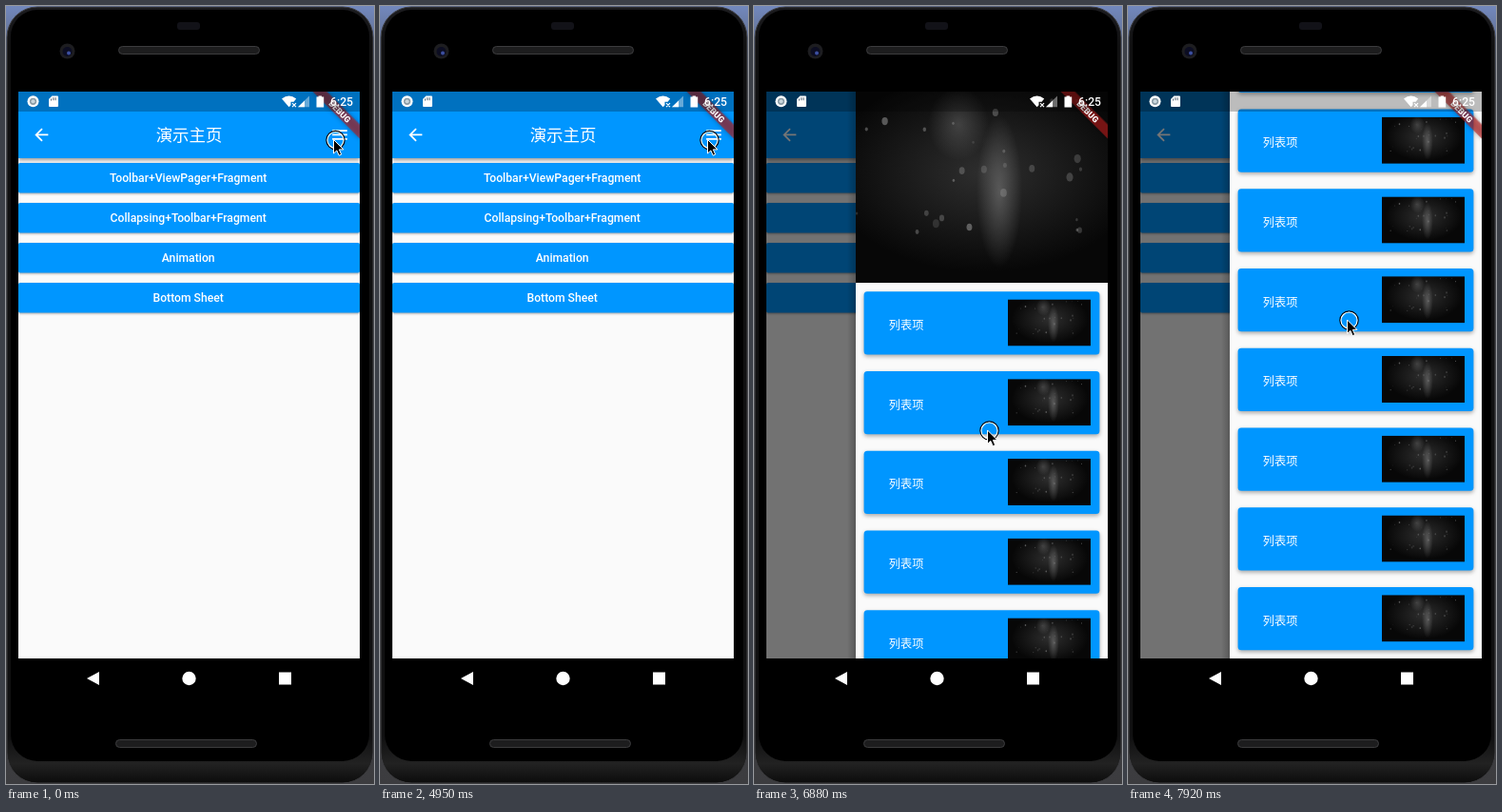
An HTML page for the animation above (8 s loop, 387x818 px).

```html
<!DOCTYPE html>
<html lang="zh">
<head>
<meta charset="utf-8">
<title>Drawer demo</title>
<style>
  html, body { margin: 0; width: 100%; height: 100%; overflow: hidden; background: #000; }
  svg { display: block; width: 387px; height: 818px; }
  text { fill: #fff; text-anchor: middle; font-family: Roboto, "Noto Sans CJK SC", "Noto Sans CJK", sans-serif; font-size: 12.2px; }
  .medium { font-weight: 500; }
  .raised { filter: drop-shadow(0 1px 1px rgba(0,0,0,.35)); }
  .card { filter: drop-shadow(0 2px 2px rgba(0,0,0,.33)); }
</style>
</head>
<body>
<svg viewBox="0 0 387 818" xmlns="http://www.w3.org/2000/svg">
  <defs>
    <clipPath id="screen"><rect x="13" y="90" width="359" height="596"/></clipPath>
    <clipPath id="bar"><rect x="13" y="90" width="359" height="70"/></clipPath>
    <clipPath id="header"><rect width="266" height="201"/></clipPath>
    <clipPath id="photoBox"><rect width="356" height="201"/></clipPath>
    <linearGradient id="body" x1="0" y1="0" x2="0" y2="1">
      <stop offset="0" stop-color="#1c1c1f"/><stop offset=".05" stop-color="#101011"/>
      <stop offset=".94" stop-color="#101011"/><stop offset=".975" stop-color="#222"/>
      <stop offset="1" stop-color="#0c0c0c"/>
    </linearGradient>
    <linearGradient id="back" x1="0" y1="0" x2="0" y2="1">
      <stop offset="0" stop-color="#7288bd"/><stop offset=".1" stop-color="#50545e"/>
      <stop offset="1" stop-color="#3c3c3f"/>
    </linearGradient>
    <linearGradient id="edge">
      <stop offset="0" stop-color="#000" stop-opacity="0"/>
      <stop offset="1" stop-color="#000" stop-opacity=".22"/>
    </linearGradient>
    <radialGradient id="glow">
      <stop offset="0" stop-color="#8a8a8a"/>
      <stop offset="1" stop-color="#8a8a8a" stop-opacity="0"/>
    </radialGradient>
    <g id="photo" clip-path="url(#photoBox)">
      <rect width="356" height="201" fill="#070707"/>
      <ellipse cx="180" cy="85" rx="165" ry="105" fill="url(#glow)" opacity=".3"/>
      <ellipse cx="153" cy="34" rx="32" ry="38" fill="url(#glow)" opacity=".35"/>
      <ellipse cx="196" cy="105" rx="24" ry="80" fill="url(#glow)" opacity=".5"/>
    </g>
  </defs>

  <!-- phone -->
  <rect width="387" height="818" fill="url(#back)"/>
  <rect x="1" y="1" width="385" height="816" rx="32" fill="url(#body)" stroke="#3c3c3f"/>
  <rect x="5" y="4" width="377" height="790" rx="28" fill="#000"/>
  <rect x="180" y="17" width="24" height="8" rx="3" fill="#121218"/>
  <g fill="#1d1d1e" stroke="#3c3c3e">
    <rect x="118.5" y="42.5" width="148" height="8" rx="4"/>
    <rect x="115.5" y="771.5" width="148" height="8" rx="4"/>
  </g>
  <circle cx="64.5" cy="47.5" r="8" fill="#1d1d20"/>
  <circle cx="64.5" cy="48" r="5" fill="#0c0d22"/>
  <circle cx="66" cy="49.5" r="2" fill="#3c4fa0"/>
  <g fill="#fff">
    <path d="M85 707L98 700V714Z"/>
    <circle cx="192.5" cy="707" r="7.2"/>
    <rect x="287" y="700.5" width="13" height="13"/>
  </g>

  <g clip-path="url(#screen)">
    <rect x="13" y="90" width="359" height="596" fill="#fafafa"/>
    <g id="buttons"></g>
    <rect x="13" y="90" width="359" height="70" fill="#0096ff" style="filter:drop-shadow(0 2px 2px rgba(0,0,0,.4))"/>
    <path transform="translate(26.9 125) scale(.873)" fill="#fff" d="M20 11H7.83l5.59-5.59L12 4l-8 8 8 8 1.41-1.41L7.83 13H20v-2z"/>
    <text x="192.5" y="142.2" style="font-size:17.46px">演示主页</text>
    <g clip-path="url(#bar)">
      <g id="ink">
        <circle cx="351" cy="135.5" r="30.6" fill="#bcbcbc" fill-opacity=".3"/>
        <circle id="splash" cx="351" cy="135.5" fill="#c8c8c8" fill-opacity=".4"/>
      </g>
    </g>
    <path transform="translate(340.5 125) scale(.873)" fill="#fff" d="M3 18h18v-2H3v2zm0-5h18v-2H3v2zm0-7v2h18V6H3z"/>
    <g id="tip">
      <rect x="213.3" y="156.5" width="150" height="28" rx="3.5" fill="#616161" fill-opacity=".9"/>
      <text x="288.3" y="174.8">Open navigation menu</text>
    </g>
    <rect id="scrim" x="13" y="90" width="359" height="596"/>

    <g id="drawer">
      <rect x="-9" y="90" width="9" height="596" fill="url(#edge)"/>
      <rect y="90" width="266" height="596" fill="#fafafa"/>
      <g id="list">
        <g transform="translate(0 90)" clip-path="url(#header)"><use href="#photo" x="-45"/></g>
      </g>
    </g>

    <g transform="translate(372 90) rotate(45)">
      <rect x="-35" y="24.4" width="70" height="10.5" fill="#b71c1c" fill-opacity=".63" style="filter:drop-shadow(0 0 2.5px rgba(0,0,0,.5))"/>
      <text y="32.9" style="font-size:8.9px;font-weight:900">DEBUG</text>
    </g>
    <rect x="13" y="90" width="359" height="21" fill-opacity=".25"/>
    <g fill="#fff">
      <circle cx="28.5" cy="100.3" r="6"/>
      <circle cx="28.5" cy="100.3" r="3.6" fill="#8a9ba5"/>
      <circle cx="28.5" cy="100.3" r="2" fill="#c9d6dc"/>
      <path d="M48.4 94.5H54q1 0 1 1V105q0 1-1 1H46q-1 0-1-1V98Z"/>
      <path d="M47.5 97.5v2M49.8 96.2v3M52 96.2v3" stroke="#456" stroke-width=".9"/>
      <path d="M290 97.4Q297.6 91.8 305.2 97.4L302.6 100.8H299.5V104.2L297.6 106.3Z"/>
      <path d="M301 102.2L305 106.2M305 102.2L301 106.2" stroke="#fff" stroke-width="1.2"/>
      <path d="M307 106.3L319 94.5V106.3Z" fill-opacity=".4"/>
      <path d="M307 106.3L314 99.4V106.3Z"/>
      <path d="M326.5 95.6H328.6V94.4H332V95.6H334.2V106.5H326.5Z"/>
    </g>
    <text class="medium" x="353" y="105">6:25</text>
  </g>

  <g id="cursor" fill="none">
    <circle r="9.6" stroke="#000" stroke-width="1.3"/>
    <circle r="8.5" stroke="#fff" stroke-width="1.1"/>
    <path transform="translate(-2 -.5)" d="M0 0V14.5L3.4 11.4L5.7 16.7L8.2 15.6L5.9 10.4H10.4Z" fill="#000" stroke="#fff"/>
  </g>
</svg>
<script>
const $ = id => document.getElementById(id);
const add = (id, markup) => $(id).insertAdjacentHTML('beforeend', markup);
const clamp = v => Math.min(1, Math.max(0, v));
const LOOP = 8000, TICK = 150;
const SCREEN_RIGHT = 372, DRAWER_WIDTH = 265, MAX_SCROLL = 443;

// A few seeded drops on the rainy window
let seed = 11;
const random = () => (seed = seed * 16807 % 2147483647) / 2147483647;
for (let i = 0; i < 30; i++) {
  const r = 1.2 + 2.4 * random() ** 2;
  add('photo', `<ellipse cx="${30 + 310 * random()}" cy="${8 + 145 * random()}" rx="${r}" ry="${r * 1.3}"
    fill="#999" fill-opacity="${.2 + .35 * random()}"/>`);
}

['Toolbar+ViewPager+Fragment', 'Collapsing+Toolbar+Fragment', 'Animation', 'Bottom Sheet'].forEach((label, i) => {
  const y = 165 + i * 42;
  add('buttons', `<rect class="raised" x="13" y="${y}" width="359" height="31.4" rx="1.7" fill="#0096ff"/>
    <text class="medium" x="191.7" y="${y + 20.2}">${label}</text>`);
});

for (let i = 0; i < 10; i++) {
  add('list', `<g transform="translate(8.6 ${300.2 + i * 83.76})">
    <rect class="card" width="247.8" height="66.2" rx="3.5" fill="#0096ff"/>
    <text x="44.5" y="39.6">列表项</text>
    <use href="#photo" transform="translate(151.4 8.2) scale(.2445)"/></g>`);
}

// Pointer path: the menu icon, a list item, then a flick upwards
const icon = [346.5, 141], item = [247.5, 446.5], release = [232.5, 330.5];
const curve = (a, b, c, u) => a.map((v, i) => (1 - u) ** 2 * v + 2 * u * (1 - u) * b[i] + u * u * c[i]);
const pointer = (travel, flick) => flick > 0
  ? curve(item, [319, 170], release, flick)
  : curve(icon, [-108, 480], item, travel);

const snap = (t, start, step = TICK) => Math.floor((t - start) / step) * step;
const smooth = u => u * u * (3 - 2 * u);

// Critically damped spring, settling at 1
function spring(ms) {
  const w = .023 * Math.max(0, ms), value = 1 - (1 + w) * Math.exp(-w);
  return value > .99 ? 1 : value;
}

// Long press: the splash grows, then gives way to the tooltip
function longPress(t, start, end) {
  const age = t < end ? snap(t, start) : -1;
  return { age, ink: age >= 0 && age < 600 ? 1 : 0, tip: clamp((age - 300) / 250) };
}

function draw() {
  const t = performance.now() % LOOP;
  const press = t < 3750 ? longPress(t, 750, 3300) : longPress(t, 3750, 4950);
  const open = spring(snap(t, 0) - 5080);
  const travel = clamp((snap(t, 5850, 147.5) / 147.5 + 1) / 5);
  const flick = clamp(snap(t, 6880, 148.5) / 1039.5);

  move('cursor', ...pointer(travel, flick));
  $('splash').setAttribute('r', 10 + 20.6 * clamp(press.age / 450));
  $('ink').setAttribute('opacity', press.ink);
  $('tip').setAttribute('opacity', press.tip);
  $('scrim').setAttribute('opacity', open * .54);
  $('drawer').setAttribute('visibility', open ? 'visible' : 'hidden');
  move('drawer', Math.round(SCREEN_RIGHT - open * DRAWER_WIDTH), 0);
  move('list', 0, -MAX_SCROLL * smooth(flick) ** 1.05);
  requestAnimationFrame(draw);
}

function move(id, x, y) {
  $(id).setAttribute('transform', `translate(${x} ${y})`);
}
draw();
</script>
</body>
</html>
```
